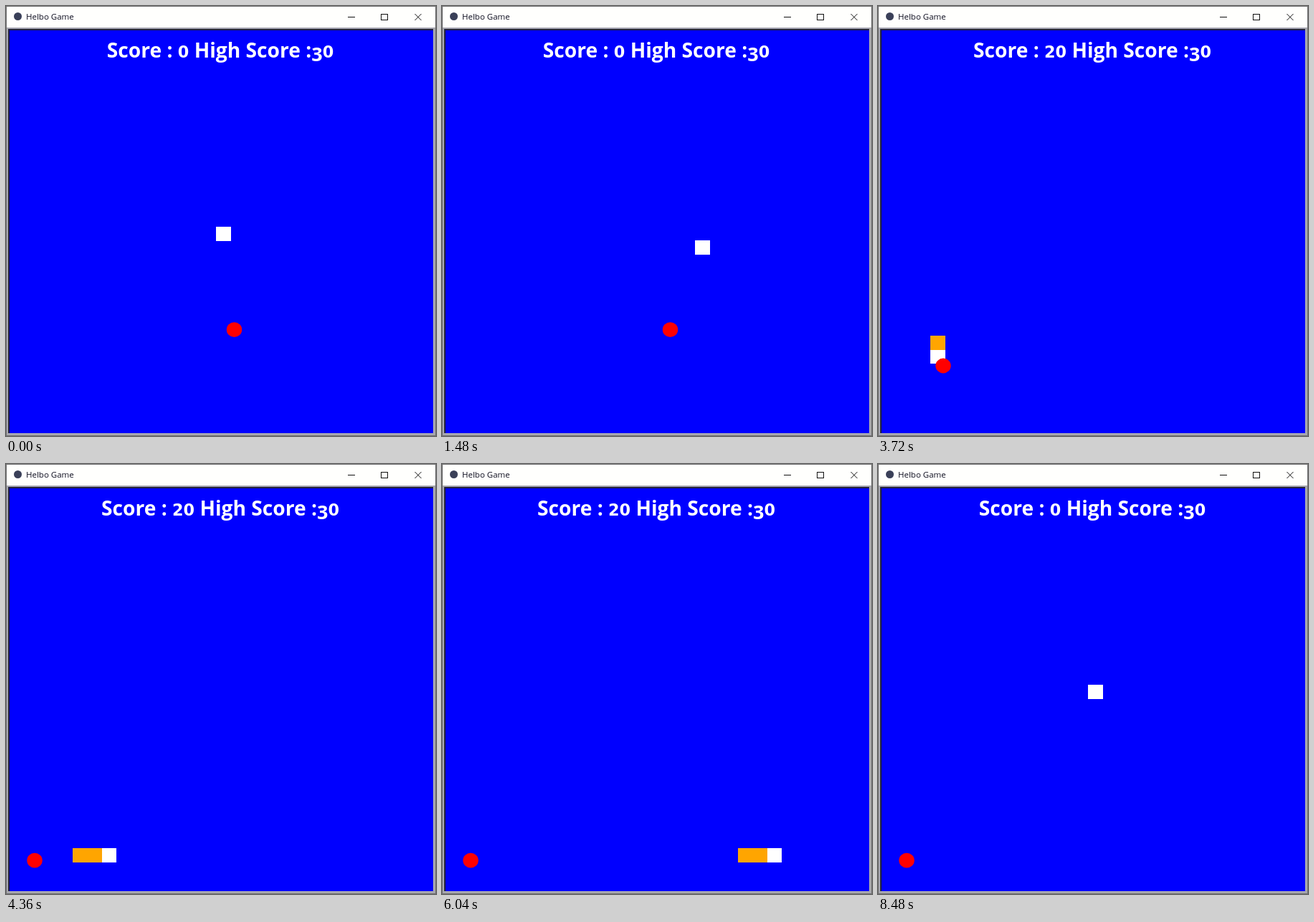
Animation of 600x600 px, one loop 8.68 s. Source, as an HTML page:

```html
<!DOCTYPE html>
<html lang="en">
<head>
<meta charset="utf-8">
<title>Helbo Game</title>
<style>
  html, body { margin: 0; width: 100%; height: 100%; overflow: hidden; background: #fff; }
  svg { display: block; width: 100vw; height: 100vh; }
  .caption { font: 11.5px "Open Sans", "Noto Sans", sans-serif; fill: #112; }
  .score { font: 700 28.2px "Open Sans", "Noto Sans", sans-serif; fill: #fff; text-anchor: middle; white-space: pre; }
  .round { font: 700 22.3px "DejaVu Sans", sans-serif; }
  .slim { font-size: 22.3px; }
  .low { font-size: 27px; }
  .buttons { fill: none; stroke: #111; stroke-width: 1; }
</style>
</head>
<body>
<svg viewBox="0 0 600 600" xmlns="http://www.w3.org/2000/svg">
  <defs><clipPath id="field"><rect x="5" y="34" width="591" height="562"/></clipPath></defs>

  <!-- window frame -->
  <rect width="600" height="600" fill="#707070"/>
  <rect x="1" y="1" width="598" height="598" fill="#fffffd"/>
  <rect x="1" y="30" width="598" height="569" fill="#a8a8b0"/>
  <rect x="3" y="32" width="593" height="564" fill="#20203c"/>
  <rect x="5" y="34" width="591" height="562" fill="#00f"/>

  <!-- title bar -->
  <circle cx="16.5" cy="14.5" r="5.5" fill="#3a4058"/>
  <text class="caption" x="28" y="19">Helbo Game</text>
  <g class="buttons">
    <path d="M477 15.5H487"/>
    <rect x="523.5" y="11.5" width="9" height="8"/>
    <path d="M570.5 11L579.5 20M579.5 11L570.5 20"/>
  </g>

  <g clip-path="url(#field)">
    <rect id="head" width="21" height="20" fill="#fff"/>
    <ellipse id="food" rx="10.7" ry="10.4" fill="#f00"/>
    <rect class="body" width="21" height="20" fill="#ffa500"/>
    <rect class="body" width="21" height="20" fill="#ffa500"/>
  </g>
  <text id="score" class="score" x="299" y="72"></text>
</svg>

<script>
const LOOP = 8680, TICK = 40, STEP = 104, FIRST = 280;
const CRASH_PAUSE = 1000;
const ROUTE = [["U", 4], ["R", 3], ["D", 11], ["L", 14], ["D", 5], ["R", 26]];
const DIRS = { U: [0, -1], D: [0, 1], L: [-1, 0], R: [1, 0] };
const BITES = [20, 34];                              // moves on which food is reached
const FOODS = [[318.5, 451.7], [91, 502], [40, 553.2]];

// grid cells visited, one per move
const cells = [[0, 0]];
for (const [dir, count] of ROUTE) {
  for (let i = 0; i < count; i++) {
    const [x, y] = cells[cells.length - 1];
    cells.push([x + DIRS[dir][0], y + DIRS[dir][1]]);
  }
}
const lastMove = cells.length - 1;
const crashEnd = FIRST + (lastMove - 1) * STEP + CRASH_PAUSE;

const head = document.getElementById("head");
const food = document.getElementById("food");
const body = document.querySelectorAll(".body");
const label = document.getElementById("score");

function place(el, [col, row]) {
  el.setAttribute("x", 293 + 20 * col);
  el.setAttribute("y", 308 + 19 * row);
}

// old-style figures: 0 1 2 at small-letter height, 3 below the baseline
const small = n => String(n).replace(/\d/g, d =>
  `<tspan class="${d === "1" ? "slim" : "round"}">${d}</tspan>`);
const BEST = `<tspan class="low" dy="5">3</tspan><tspan class="round" dy="-5">0</tspan>`;

let shown = null;
function setScore(n) {
  if (n === shown) return;
  shown = n;
  label.innerHTML = `Score : ${small(n)} High Score :${BEST}`;
}

function draw(time) {
  const t = Math.floor((time % LOOP) / TICK) * TICK;
  const move = Math.min(lastMove, Math.max(0, Math.floor((t - FIRST) / STEP) + 1));
  const reset = t >= crashEnd + STEP;
  const eaten = BITES.filter(b => move > b).length;

  place(head, reset ? cells[0] : cells[move]);
  body.forEach((part, i) => {
    const visible = !reset && i < eaten;
    part.style.display = visible ? "" : "none";
    if (visible) place(part, cells[move - 1 - i]);
  });
  food.setAttribute("cx", FOODS[eaten][0]);
  food.setAttribute("cy", FOODS[eaten][1]);
  setScore(t >= crashEnd ? 0 : 10 * BITES.filter(b => move >= b).length);
}

const start = performance.now();
function frame() {
  draw(performance.now() - start);
  requestAnimationFrame(frame);
}
draw(0);
requestAnimationFrame(frame);
</script>
</body>
</html>
```
